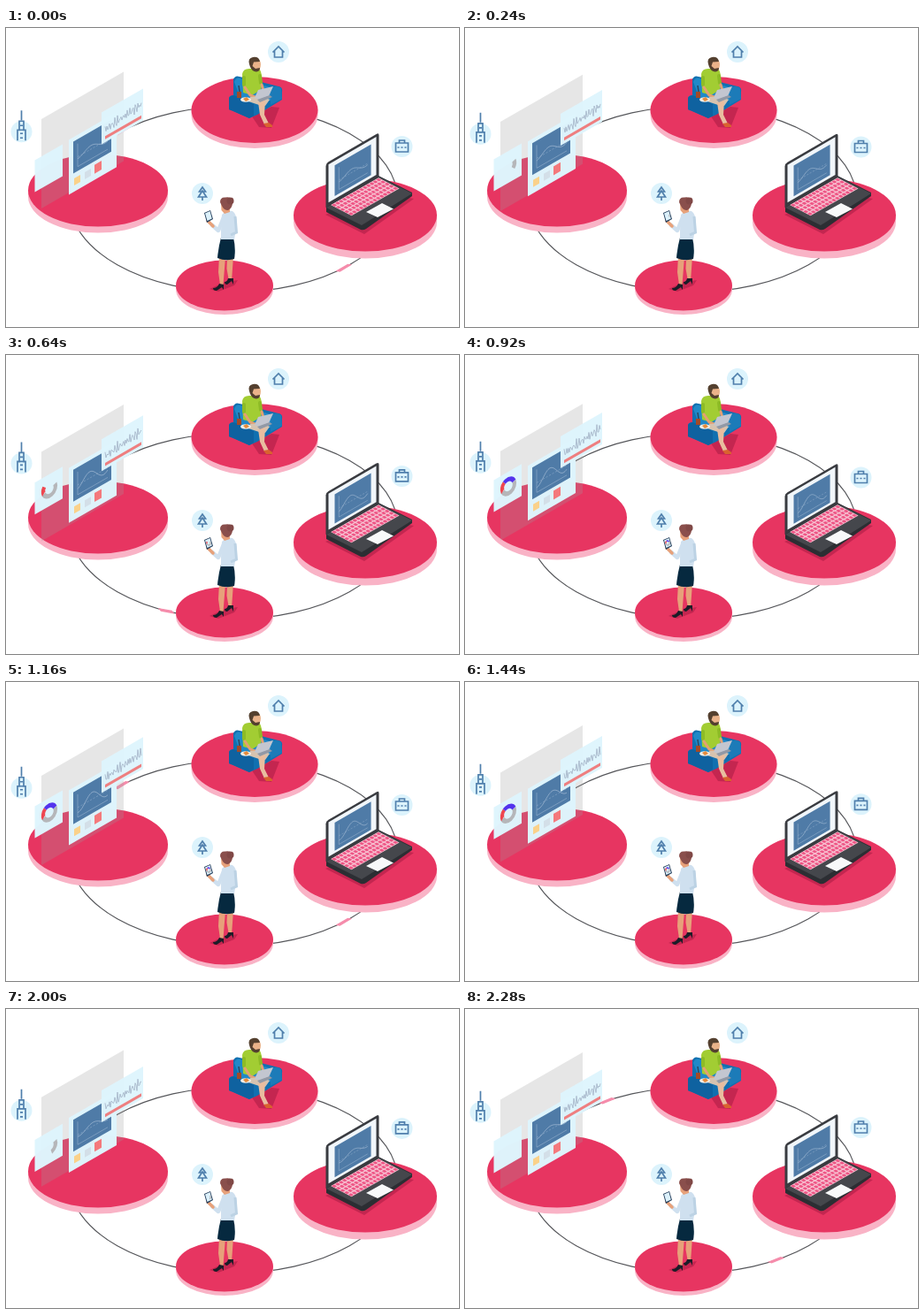
These frames come from a looping animation (512 by 338 pixels, 2.32 s). An HTML page:

```html
<!DOCTYPE html>
<html lang="en">
<head>
<meta charset="utf-8">
<title>Connected workplaces</title>
<style>
html, body { margin: 0; width: 100%; height: 100%; overflow: hidden; background: #fff; }
svg { display: block; width: 100vw; height: 100vh; }
.line { fill: none; stroke: #4f7fac; stroke-width: 1.7; }
.thin { fill: none; stroke: #a3bbd5; stroke-width: .6; }
.sheet { fill: #dff5fd; fill-opacity: .98; }
.ring { fill: none; stroke-width: 5; }
.badge { fill: #dcf3fc; }
</style>
</head>
<body>
<svg viewBox="0 0 512 338">
  <defs>
    <g id="plot">
      <path d="M0 0H43V36H0z" fill="#4f7ba7"/>
      <path class="thin" d="M5 5V31H39" opacity=".75"/>
      <path class="thin" d="M5 20H39" stroke-dasharray="2 1.5" opacity=".6"/>
      <path class="thin" id="curve"/>
    </g>
    <g id="donut" transform="scale(.87 1) rotate(-24)">
      <circle class="ring" r="8" pathLength="1" stroke="#b5b6b9"/>
      <circle class="ring" r="8" pathLength="1" stroke="#ee4750"/>
      <circle class="ring" r="8" pathLength="1" stroke="#5333ed"/>
    </g>
  </defs>

  <ellipse cx="257" cy="193.5" rx="185.5" ry="105" fill="none" stroke="#55565a" stroke-width="1.1"/>
  <g id="pulses" fill="#f58cab"></g>
  <g id="discs"></g>

  <!-- dashboard -->
  <g id="back"><path d="M0 0H93V101H0z" fill="#9b9b9b" opacity=".25"/></g>
  <g id="report">
    <path class="sheet" d="M0 0H54V62H0z"/>
    <use href="#plot" x="5" y="5"/>
    <path d="M6 47h7v8h-7z" fill="#fad18a"/>
    <path d="M18 47h7v8h-7z" fill="#d3dfe8"/>
    <path d="M29 45h8v10h-8z" fill="#f4797c"/>
  </g>
  <g id="trend">
    <path class="sheet" d="M0 0H47V36H0z"/>
    <path d="M4 29H45V32.5H4z" fill="#ee7f80"/>
    <path id="spikes" fill="none" stroke="#a3b2c6" stroke-width=".7"/>
  </g>
  <g id="share">
    <path class="sheet" d="M0 0H31.5V36H0z"/>
    <use href="#donut" transform="translate(16.5 16.5) skewY(8)"/>
  </g>

  <!-- man on the sofa -->
  <path d="M278 100L300 89L309 90L300 113L286 112z" fill="#c42650"/>
  <path d="M257 58Q259 53 264 55L308 66Q313 67 312 72V81L284 98L275 102L252 92V80Q252 76 257 76z" fill="#1170b0"/>
  <path d="M258 61Q260 55 265 57L302 68L299 82L266 82z" fill="#2089c8"/>
  <path d="M252 79Q255 75 260 77L280 86V99L275 102L252 92z" fill="#0f62a0"/>
  <path d="M299 68Q305 64 311 68L312 80L299 87z" fill="#1c7bb8"/>
  <path d="M267 52Q268 45 277 46L285 45Q289 48 289 56L288 70L278 76L268 73z" fill="#a2cd33"/>
  <path d="M269 56L269 64M287 54L288 62" stroke="#8dbb26" stroke-width="4" stroke-linecap="round"/>
  <path d="M270 67L276 76L284 79M289 64L291 71" fill="none" stroke="#e3a074" stroke-width="3" stroke-linecap="round"/>
  <path d="M276 78L290 77L298 81L293 88L286 87L274 83z" fill="#d6c3b0"/>
  <path d="M285 84L293 82L292 98L297 108L292 109L287 98z" fill="#e9bd9f"/>
  <path d="M291 108L297 107L301 110V112L294 112z" fill="#d9622f"/>
  <path d="M281 79L285 70L302 66L297 77L286 81z" fill="#c3c6d0"/>
  <path d="M284 81L298 76L301 78L287 84z" fill="#9299a6"/>
  <path d="M277 38Q277 35 282 35Q288 35 288 41Q288 48 283 49Q277 48 277 38z" fill="#eab38a"/>
  <path d="M275 41Q273 34 279 33Q286 32 287 38L280 38.5L278.500 43L282 46L287 45Q287 49 283 49.500Q278 49 276 44z" fill="#54402f"/>
  <ellipse cx="271" cy="81" rx="6" ry="2.800" fill="#f0eee7"/>
  <path d="M268 80l4-2 3 3-4 2z" fill="#e58b3c"/>
  <path d="M261 72h5v7h-5z" fill="#a34a28"/>
  <path d="M263 65l1 7" stroke="#29475f" stroke-width="1.500"/>

  <!-- laptop -->
  <path d="M361 211L420 185L461 193L405 233z" fill="#c42650"/>
  <path d="M362 202L421 167L459 186V190L407 227Q404 229 401 228L362 208z" fill="#2c2e33"/>
  <path d="M362 203L421 168L459 187L402 223z" fill="#45474c"/>
  <g transform="matrix(3.860 -2.200 4.700 2.450 367 200)">
    <path d="M0 0H14V5H0z" fill="#f7c4d3"/>
    <path d="M.1 .5H14M.1 1.500H14M.1 2.500H14M.1 3.500H14M.1 4.500H14" stroke="#ee5585" stroke-width=".72" stroke-dasharray=".72 .28"/>
  </g>
  <path d="M407 208L425 198L438 204.500L420 214z" fill="#f8f9fa"/>
  <g id="screen">
    <path d="M0 0V-47Q0 -50 3 -50H57Q60 -50 60 -47V0z" fill="#393b40"/>
    <path d="M3 -4V-47H57V-4z" fill="#f1f6fa"/>
    <use href="#plot" transform="translate(10 -42) scale(.955 .97)"/>
  </g>

  <!-- woman with a phone -->
  <path d="M230 295L248 287L262 285L258 291L240 298z" fill="#c42650"/>
  <path d="M241 258L248 259L245.500 290L242 290L240 276zM250 259L257 258L255 286L252 286L249.500 272z" fill="#e7a17a"/>
  <path d="M234 294Q239 294 241 289L246 290L246 296L244 293L238 297Q234 297 234 294zM247 287Q250 287 251 283L257 283V290L255 286L250 290Q247 290 247 287z" fill="#1b1d28"/>
  <path d="M243 237L257 237Q260 249 258 261Q248 264 239 260Q240 248 243 237z" fill="#06293f"/>
  <path d="M244 211Q249 206 256 207Q261 210 261 222L258 239L243 239L243 229z" fill="#cfe0ef"/>
  <path d="M246 214L240 229L232 222" fill="none" stroke="#cfe0ef" stroke-width="4.500" stroke-linejoin="round"/>
  <path d="M259 213L260.500 231L254 234" fill="none" stroke="#bcd2e4" stroke-width="3"/>
  <path d="M234 224L228 218" stroke="#e7a17a" stroke-width="3.500" stroke-linecap="round"/>
  <path d="M243 198L249 194L253 200V208L247 210L243.500 206z" fill="#e7a17a"/>
  <path d="M242 197Q242 191 248 191.500Q256 190 256 198Q256 203 251 206Q246 206 244 201z" fill="#8a4f4c"/>
  <circle cx="253.500" cy="195.500" r="4" fill="#804846"/>
  <path d="M224 209L231 206L234 216L227 220z" fill="#243e5b"/>
  <path d="M225 209.500L230.500 207L232.800 215.500L227.500 218z" fill="#dcf1fb"/>
  <use href="#donut" transform="translate(229 212.500) rotate(-18) scale(.3)"/>

  <!-- badges, each drawn around its centre -->
  <g transform="translate(308 27)">
    <circle class="badge" r="12"/>
    <path class="line" d="M-6.500 .5L0 -6L6.500 .5M-4.500 -1V6H4.500V-1"/>
  </g>
  <g transform="translate(222 187)">
    <circle class="badge" r="12"/>
    <path class="line" d="M0 -7L-3.500 -2H3.500zM0 -3L-4.500 4H4.500zM0 4V8"/>
  </g>
  <g id="work">
    <circle class="badge" r="12"/>
    <path class="line" d="M-7 -4H7V6H-7zM-3 -4.500V-7H3V-4.500"/>
    <path class="line" d="M-5 1H5" stroke-dasharray="2 2"/>
  </g>
  <g id="city">
    <circle class="badge" r="12"/>
    <path class="line" d="M0 -24V-13M-2.500 -1V-12H2.500V-1M-4.500 10V-2H4.500V10M-1.500 -7H1.500M-1.500 2H1.500M-1.500 7H1.500"/>
  </g>
</svg>
<script>
const LOOP = 2320, BEAT = LOOP / 2, TAU = Math.PI * 2;
const CX = 257, CY = 193.5, RX = 185.5, RY = 105;
const $ = id => document.getElementById(id);
const clamp = v => Math.max(0, Math.min(1, v));
const wave = (t, shift) => Math.cos((t - shift) / LOOP * TAU);

// cx, cy, rx, ry, thickness
$('discs').innerHTML = [
  [281, 92.5, 71.5, 37.5, 6], [104, 183.5, 79, 41, 7],
  [406, 211.5, 81, 41, 8], [247, 291, 55, 28.5, 4.5]
].map(([x, y, rx, ry, h]) =>
  `<path d="M${x - rx} ${y}v${h}a${rx} ${ry} 0 0 0 ${2 * rx} 0v${-h}z" fill="#f9b3c6"/>
   <ellipse cx="${x}" cy="${y}" rx="${rx}" ry="${ry}" fill="#e73561"/>`).join('');

// angle at the beat, and the beat's place in the cycle
const pulses = [[48, 0], [-132.6, 0], [131.8, 580], [-52.4, 580]].map(([angle, beat]) => {
  const el = document.createElementNS('http://www.w3.org/2000/svg', 'path');
  el.setAttribute('d', 'M-10 -1L6 -2L10 1L-6 2z');
  $('pulses').append(el);
  return { el, angle, beat };
});

function movePulse({ el, angle, beat }, t) {
  const p = (t - beat + 1.5 * BEAT) % BEAT - BEAT / 2;
  el.setAttribute('visibility', p > -140 && p < 100 ? 'visible' : 'hidden');
  const a = (angle - .29 * p) * TAU / 360;
  const x = CX + RX * Math.cos(a), y = CY + RY * Math.sin(a);
  const turn = Math.atan2(-RY * Math.cos(a), RX * Math.sin(a)) * 360 / TAU;
  el.setAttribute('transform', `translate(${x} ${y}) rotate(${turn})`);
}

function place(id, x, y, slope = 0, height = 1) {
  $(id).setAttribute('transform', `matrix(1 ${-slope} 0 ${height} ${x} ${y})`);
}

function trace(id, from, to, step, f) {
  let d = '';
  for (let x = from; x <= to; x += step) d += `${d ? 'L' : 'M'}${x} ${f(x).toFixed(2)}`;
  $(id).setAttribute('d', d);
}

const rings = [...$('donut').children];
const shares = [[0, .5], [.5, .7], [.7, 1]];

function draw(t) {
  pulses.forEach(p => movePulse(p, t));
  place('back', 40, 104.5 + 5 * wave(t, 700), .575);
  place('report', 71, 124.5 + 4 * wave(t, 400), .575);
  place('trend', 108, 92.5 + 4.5 * wave(t, 300), .575);
  place('share', 32.5, 145 + 4.5 * wave(t, 0), .575);
  place('screen', 361.5, 203, .58, .955 + .045 * wave(t, 0));
  place('work', 447.5, 136.5 - 2.5 * wave(t, 0));
  place('city', 17.5, 118.5 + 4 * wave(t, 700));

  const sweep = Math.min(clamp((t - 100) / 820), clamp((2200 - t) / 760));
  rings.forEach((ring, i) => {
    const [a, b] = shares[i], len = Math.max(0, Math.min(sweep, b) - a);
    ring.setAttribute('stroke-dasharray', `0 ${a} ${len} 2`);
    ring.setAttribute('visibility', len ? 'visible' : 'hidden');
  });

  const swing = 5 + 2 * wave(t, 1000);
  trace('curve', 5, 39, 1, x => 19 - swing * Math.sin(x * .2 - 2.6 + .5 * wave(t, 500)));
  trace('spikes', 4, 45, 1, x =>
    22 - x * .12 + 5 * Math.sin(x * 2.3 + 1) * Math.sin(x * .43 + wave(t, 200)) + 2.5 * Math.sin(x * 4.1));
}

function tick() {
  draw(performance.now() % LOOP);
  requestAnimationFrame(tick);
}
tick();
</script>
</body>
</html>
```
